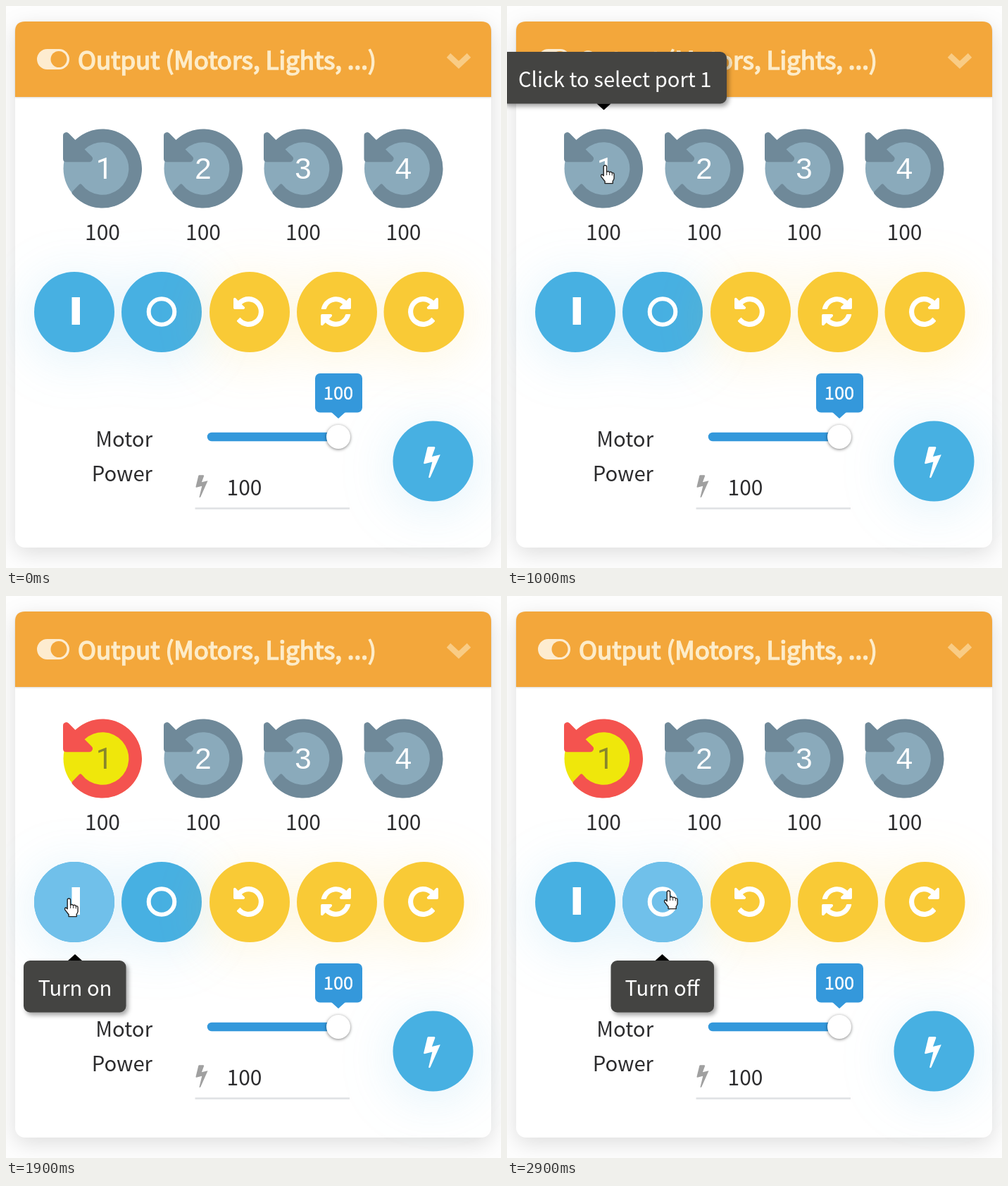
An HTML page for the animation above (3000 ms loop, 703 by 797 pixels).

```html
<!DOCTYPE html>
<html lang="en">
<head>
<meta charset="utf-8">
<title>Output panel</title>
<style>
html, body { margin: 0; width: 100%; height: 100%; overflow: hidden; background: #fefefe; }
svg { display: block; width: 703px; height: 797px; }
text { font: 30px "Noto Sans CJK SC", "Noto Sans CJK JP", "Noto Sans", sans-serif; fill: #2c2c2e; }
.mid { text-anchor: middle; }
.end { text-anchor: end; font-size: 29.3px; }
.title { font-size: 35px; fill: #fdecc9; stroke: #fdecc9; stroke-width: 1.6px; }
.num { font: 42px "Liberation Sans", Arial, sans-serif; fill: #fff; text-anchor: middle; }
.num1 { font-family: Roboto, sans-serif; }
.badge { font-size: 25.5px; fill: #fff; stroke: #fff; stroke-width: .4px; text-anchor: middle; }
.card { filter: drop-shadow(0 8px 15px rgba(0, 0, 0, .13)); }
.header { filter: drop-shadow(0 1px 1px rgba(0, 0, 0, .15)); }
.blue { fill: #47b0e2; filter: drop-shadow(0 10px 38px rgba(71, 176, 226, .18)); }
.gold { fill: #f9ca36; filter: drop-shadow(0 10px 38px rgba(249, 202, 54, .18)); }
.knob { fill: #fff; filter: drop-shadow(0 1px 2px rgba(0, 0, 0, .5)); }
.icon { fill: #fff; }
.disc { fill: #8aaabb; }
.ring { fill: #6f8999; }
.tip rect { fill: #444442; filter: drop-shadow(3px 4px 3px rgba(0, 0, 0, .35)); }
.tip text { font-size: 29.2px; fill: #fff; }
.pointer { stroke: #222; stroke-width: 1.5px; stroke-linejoin: round; fill: #fff; }

.ring1, .disc1, .num1, .tip, .hover, #cursor, #cursor g { animation: 3s step-end infinite; }
.ring1 { animation-name: select; }
.disc1 { animation-name: light; }
.num1 { animation-name: dim; }
.tip.port { animation-name: tip-port; }
.tip.on { animation-name: tip-on; }
.tip.off { animation-name: tip-off; }
.hover { fill: #70c0ea; }
.hover.on { animation-name: hover-on; }
.hover.off { animation-name: hover-off; }
#cursor { animation-name: move; }
#cursor .hand { animation-name: hand; }
#cursor .arrow { animation-name: arrow; }
#cursor .beam { animation-name: beam; }

@keyframes select { 0% { fill: #6f8999 } 40%, 100% { fill: #f4534f } }
@keyframes light { 0% { fill: #8aaabb } 60%, 100% { fill: #efe70b } }
@keyframes dim { 0% { fill: #fff } 60%, 100% { fill: #87852c } }
@keyframes tip-port { 0% { opacity: 0 } 29.5% { opacity: .6 } 33% { opacity: 1 } 46% { opacity: .4 } 49.5%, 100% { opacity: 0 } }
@keyframes tip-on { 0% { opacity: 0 } 49.5% { opacity: .5 } 53% { opacity: 1 } 76% { opacity: .4 } 79.5%, 100% { opacity: 0 } }
@keyframes tip-off { 0% { opacity: 0 } 93% { opacity: .5 } 96%, 100% { opacity: 1 } }
@keyframes hover-on { 0% { opacity: 0 } 49.5% { opacity: 1 } 66%, 100% { opacity: 0 } }
@keyframes hover-off { 0% { opacity: 0 } 93%, 100% { opacity: 1 } }
@keyframes hand { 0% { opacity: 0 } 26% { opacity: 1 } 46% { opacity: 0 } 49.5% { opacity: 1 } 66% { opacity: 0 } 93%, 100% { opacity: 1 } }
@keyframes arrow { 0% { opacity: 0 } 46% { opacity: 1 } 49.5% { opacity: 0 } 66% { opacity: 1 } 73% { opacity: 0 } 79.5% { opacity: 1 } 93%, 100% { opacity: 0 } }
@keyframes beam { 0% { opacity: 0 } 73% { opacity: 1 } 79.5%, 100% { opacity: 0 } }
@keyframes move {
  0% { transform: translate(140px, 226px) }
  46% { transform: translate(120px, 310px) }
  49.5% { transform: translate(92px, 400px) }
  53% { transform: translate(90px, 429px) }
  66% { transform: translate(112px, 500px) }
  69.5% { transform: translate(145px, 570px) }
  73% { transform: translate(162px, 618px) }
  76% { transform: translate(130px, 660px) }
  79.5% { transform: translate(105px, 688px) }
  83% { transform: translate(85px, 690px) }
  89.5% { transform: translate(140px, 590px) }
  93% { transform: translate(215px, 440px) }
  96%, 100% { transform: translate(230px, 418px) }
}
</style>
</head>
<body>
<svg viewBox="0 0 703 797">
  <defs>
    <path id="turn" d="M-38.6-40.5A56 56 0 1 1-43.1 35.8Q-43.8 34-42.9 32.7L-33 22.6Q-31 21-29.5 22.8A37.3 37.3 0 1 0-25.4-27.3L-15.4-17.3Q-13-15-14.4-12.2-15.6-9.3-18.7-9.3H-51.3Q-56-9.3-56-14V-46.7Q-56-50-53.1-51-50.3-52.5-48-50Z"/>
    <path id="half" d="M54 12A56 56 0 0 1-38.7 40.5L-48 50Q-55.5 53-56 46.7V14Q-56 9.3-51.3 9.3H-18.7Q-12 11-15.4 17.3L-25.4 27.3A37.3 37.3 0 0 0 31.6 19.5L35.5 11Q36 9.3 37.7 9.3H51.7Q55 9.5 54 12Z"/>
    <path id="bolt" d="M11.6-8.7L-2.5 23Q-4.9 24.5-4.8 22.4L.4 1-10.4 3.7Q-12.2 3.8-11.8 2.4L-6.5-19.5-5.3-20.4H3.4L4.5-19.2-.1-6.5 10.4-9.1Q12-9.5 11.6-8.7Z"/>
    <circle id="disc" r="55.5"/>
    <circle id="button" r="57"/>
  </defs>

  <rect class="card" x="13" y="22" width="676" height="746" rx="14" fill="#fff"/>
  <path class="header" d="M13 129V36Q13 22 27 22H675Q689 22 689 36V129Z" fill="#f3a73b"/>
  <rect x="44" y="61" width="46" height="29" rx="14.5" fill="#fdecd0"/>
  <circle cx="75" cy="75.5" r="11.5" fill="#f3a73b"/>
  <text class="title" x="102" y="90">Output (Motors, Lights, ...)</text>
  <path d="M628.5 70L643 83.5 657.5 70" fill="none" stroke="#f9cc85" stroke-width="8"/>

  <g class="blue">
    <use href="#button" x="97" y="434"/>
    <use href="#button" x="221" y="434"/>
    <use href="#button" x="606.5" y="645.5"/>
  </g>
  <g class="gold">
    <use href="#button" x="346" y="434"/>
    <use href="#button" x="470" y="434"/>
    <use href="#button" x="593.5" y="434"/>
  </g>
  <use class="hover on" href="#button" x="97" y="434"/>
  <use class="hover off" href="#button" x="221" y="434"/>
  <g class="icon">
    <rect x="93.5" y="413" width="11.5" height="39"/>
    <circle cx="221" cy="433.5" r="18.3" fill="none" stroke="#fff" stroke-width="6"/>
    <use href="#turn" transform="translate(344.5 433.5) scale(.383)"/>
    <g transform="translate(468.5 433.5) scale(.383)">
      <use href="#half"/>
      <use href="#half" transform="rotate(180)"/>
    </g>
    <use href="#turn" transform="translate(592.5 433.5) scale(-.383 .383)"/>
    <use href="#bolt" x="605" y="645.5"/>
  </g>

  <g transform="translate(137 230.5)">
    <use class="disc disc1" href="#disc"/><use class="ring ring1" href="#turn"/>
    <text class="num num1" x="2.5" y="14.5">1</text><text class="mid" y="101.5">100</text>
  </g>
  <g transform="translate(280 230.5)">
    <use class="disc" href="#disc"/><use class="ring" href="#turn"/>
    <text class="num" y="14.5">2</text><text class="mid" y="101.5">100</text>
  </g>
  <g transform="translate(422 230.5)">
    <use class="disc" href="#disc"/><use class="ring" href="#turn"/>
    <text class="num" y="14.5">3</text><text class="mid" y="101.5">100</text>
  </g>
  <g transform="translate(564.5 230.5)">
    <use class="disc" href="#disc"/><use class="ring" href="#turn"/>
    <text class="num" y="14.5">4</text><text class="mid" y="101.5">100</text>
  </g>

  <text class="end" x="208" y="625">Motor</text>
  <text class="end" x="208" y="674">Power</text>
  <path d="M292 611H472" stroke="#3498db" stroke-width="12.5" stroke-linecap="round"/>
  <circle class="knob" cx="472" cy="611" r="17"/>
  <g fill="#3498db">
    <rect x="439" y="521" width="67" height="55.5" rx="7"/>
    <path d="M462 576H482L472 585Z"/>
  </g>
  <text class="badge" x="472" y="558">100</text>
  <use href="#bolt" transform="translate(278 680) scale(.72)" fill="#a0a0a0"/>
  <text x="313.5" y="694">100</text>
  <path d="M268.5 712.5H488" stroke="#dfe1e3" stroke-width="2.5"/>

  <g class="tip port">
    <rect x="-8" y="65" width="320" height="73.5" rx="9"/>
    <path d="M127.5 138.5H147.5L137.5 147.5Z"/>
    <text x="16" y="115">Click to select port 1</text>
  </g>
  <g class="tip on">
    <rect x="25" y="517" width="145.5" height="73.5" rx="9"/>
    <path d="M88 517H108L98 508Z"/>
    <text class="mid" x="98" y="567">Turn on</text>
  </g>
  <g class="tip off">
    <rect x="147.5" y="517" width="146.5" height="73.5" rx="9"/>
    <path d="M210.5 517H230.5L220.5 508Z"/>
    <text class="mid" x="220.5" y="567">Turn off</text>
  </g>

  <g id="cursor" class="pointer">
    <g class="hand">
      <path transform="scale(.93)" d="M-3 2Q-3 0-.7 0T1.7 2V10Q4 8 6 10.5 8.5 9 10 11.5 13 11 13 14V20Q12 23 11 24V27.5H-1V24.5L-6.8 17Q-7.5 14-5 14L-3 16Z"/>
      <path transform="scale(.93)" d="M1.7 10V15M6 10.5V15M10 11.5V15.5" fill="none" stroke-width="1"/>
    </g>
    <g class="arrow">
      <path d="M0 0V18L4.2 14.3 7 21.5 10 20.3 7.2 13.5H13Z"/>
    </g>
    <g class="beam">
      <path d="M-4-12Q0-12 0-10 0-12 4-12M0-10V10M-4 12Q0 12 0 10 0 12 4 12" fill="none" stroke-width="1.3"/>
    </g>
  </g>
</svg>
</body>
</html>
```
